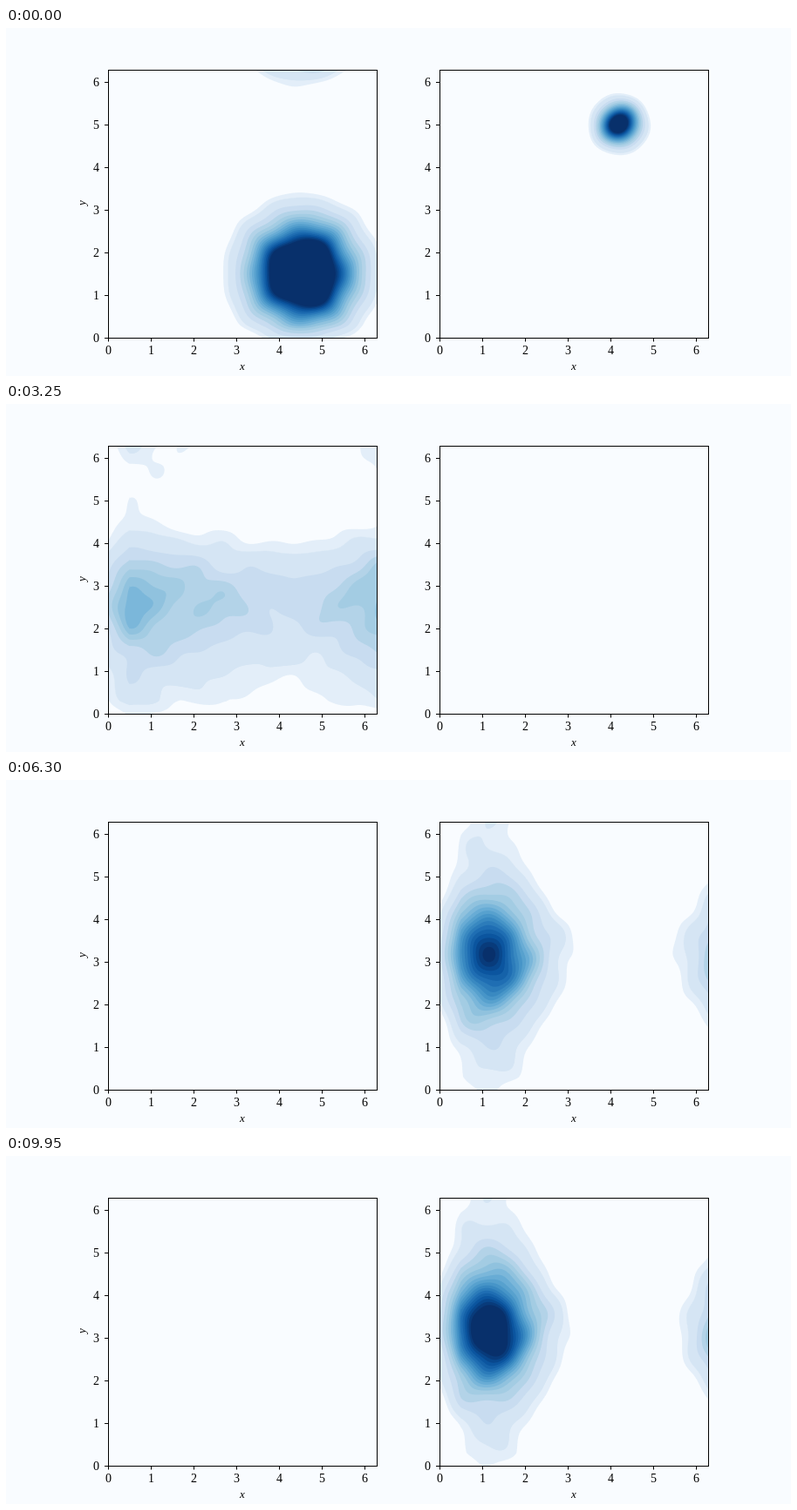
An HTML page with a canvas for the animation above (10000 ms loop, 900 by 400 pixels).

```html
<!DOCTYPE html>
<html lang="en">
<head>
<meta charset="utf-8">
<style>
  html, body { margin: 0; width: 100%; height: 100%; overflow: hidden; background: #f9fcff; }
  canvas { display: block; }
</style>
</head>
<body>
<canvas id="stage" width="900" height="400"></canvas>
<script>
const ctx = document.getElementById('stage').getContext('2d');
const SIZE = 308, TOP = 48, SPAN = 2 * Math.PI, UNIT = SIZE / SPAN;
const LOOP = 10000, STEP = 50, STEPS = LOOP / STEP;
const CELLS = SIZE / 2, CELL = SPAN / CELLS;

const mix = (a, b, k) => a + (b - a) * k;
const clamp = (v, lo, hi) => Math.max(lo, Math.min(hi, v));

// Drift towards a periodic well plus diffusion; both speed up with time.
const progress = t => .22 * Math.pow(t, 1.7);
const wellX = { centre: 1.18, pull: 1, spread: .36 };
const wellY = { centre: 3.2, pull: .68, spread: .42 };

// Density along one axis at every step, starting from a bell curve.
function evolve(mean, width, { centre, pull, spread }) {
  let p = Float64Array.from({ length: CELLS }, (_, i) => {
    let d = (i + .5) * CELL - mean;
    d -= SPAN * Math.round(d / SPAN);
    return Math.exp(-.5 * (d / width) ** 2) / (width * Math.sqrt(SPAN));
  });
  const drift = Array.from(p, (_, i) => pull * Math.sin((i + 1) * CELL - centre));
  const history = [];
  for (let step = 0; step < STEPS; step++) {
    history.push(p);
    const advance = progress((step + 1) * STEP / 1000) - progress(step * STEP / 1000);
    const substeps = Math.ceil(advance / .0015), k = advance / substeps / CELL;
    for (let s = 0; s < substeps; s++) {
      const flux = drift.map((f, i) => {
        const next = p[(i + 1) % CELLS];
        return f * (p[i] + next) / 2 + spread * (next - p[i]) / CELL;
      });
      p = p.map((v, i) => v + k * (flux[i] - flux[(i + CELLS - 1) % CELLS]));
    }
  }
  return history;
}

const population = (x, y, width) => ({ x: evolve(x, width, wellX), y: evolve(y, width, wellY) });
const crowd = population(4.55, 1.52, .665);
const seedling = population(4.2, 5, .276);

// The left crowd dies out while its offspring take over the right panel.
const panels = [
  { left: 117, phase: 0, groups: [
    { shape: crowd, mass: t => 97 * (1 - Math.min(1, t / 6.1) ** 1.7) }
  ] },
  { left: 497, phase: 2.4, groups: [
    { shape: seedling, mass: t => 10.5 * Math.exp(-.15 * t * t) },
    { shape: crowd, mass: t => 79 / (1 + Math.exp(-2.13 * (t - 5.5))) }
  ] }
];

// Blue colour scale, cut into 18 bands above the background.
const BANDS = 18, SUB = 8;
const ramp = ['f7fbff', 'deebf7', 'c6dbef', '9ecae1', '6baed6', '4292c6', '2171b5', '08519c', '08306b']
  .map(hex => [0, 2, 4].map(i => parseInt(hex.slice(i, i + 2), 16)));
function blues(s) {
  const p = clamp(s, 0, 1) * 8, i = Math.min(7, Math.floor(p));
  return ramp[i].map((c, j) => mix(c, ramp[i + 1][j], p - i));
}
const palette = [[249, 252, 255]];
for (let i = 1; i <= BANDS; i++) palette.push(blues(i < 5 ? .03 + .07 * i : .11 + .05 * i));
const shades = Uint32Array.from({ length: BANDS * SUB + 1 }, (_, j) => {
  const i = Math.min(BANDS - 1, Math.floor(j / SUB));
  const [r, g, b] = palette[i].map((c, n) => Math.round(mix(c, palette[i + 1][n], j / SUB - i)));
  return (255 << 24 | b << 16 | g << 8 | r) >>> 0;
});

const image = ctx.createImageData(SIZE, SIZE);
const pixels = new Uint32Array(image.data.buffer);
const field = new Float32Array(SIZE * SIZE);
const axis = Array.from({ length: SIZE }, (_, i) => (i + .5) / UNIT);

// The estimate loses density next to the lower seams.
const seam = (low, reach) => axis.map(v => mix(low, 1, Math.min(1, v / reach)));
const seamX = seam(.5, .5), seamY = seam(.75, .3);

// Interpolates cell values at every pixel along an axis.
function sample(cells) {
  return axis.map(v => {
    const p = v / CELL - .5 + CELLS, i = Math.floor(p);
    return mix(cells[i % CELLS], cells[(i + 1) % CELLS], p - i);
  });
}

// Slowly drifting ripples that roughen the contours.
function ripples(t, phase) {
  return [0, 1, 2].map(i => ({
    x: axis.map(x => (.14 - .02 * i) * Math.sin((2.7 + 1.6 * i) * x + phase + 2 * i + 1.1 * t)),
    y: axis.map(y => Math.sin((3 + 1.5 * i) * y + 2 * phase + i - .8 * t))
  }));
}

function fillField({ groups, phase }, step) {
  const t = step * STEP / 1000;
  const parts = groups.map(({ shape, mass }) => ({
    x: sample(shape.x[step]), y: sample(shape.y[step]), mass: mass(t)
  }));
  const waves = ripples(t, phase);
  for (let row = 0, i = 0; row < SIZE; row++) {
    const y = SIZE - 1 - row;
    const weights = parts.map(part => part.mass * part.y[y] * seamY[y]);
    for (let col = 0; col < SIZE; col++, i++) {
      let v = 0;
      for (let k = 0; k < parts.length; k++) v += weights[k] * parts[k].x[col];
      v *= seamX[col];
      if (v > .2) {
        let n = 0;
        for (const wave of waves) n += wave.x[col] * wave.y[y];
        v *= Math.exp(n / (1 + .06 * v));
      }
      field[i] = v < 1 ? (v - .65) / .35 : v;
    }
  }
}

// Flat colour per band, blended over one pixel at each contour.
function paintBands(left) {
  for (let row = 0, i = 0; row < SIZE; row++) {
    for (let col = 0; col < SIZE; col++, i++) {
      const level = field[i];
      const dx = level - field[i + (col ? -1 : 1)];
      const dy = level - field[i + (row ? -SIZE : SIZE)];
      const slope = Math.sqrt(dx * dx + dy * dy) + 1e-6;
      const contour = clamp(Math.round(level), 0, BANDS - 1);
      const offset = clamp((level - contour) / slope, -.5, .5);
      pixels[i] = shades[Math.round((contour + offset + .5) * SUB)];
    }
  }
  ctx.putImageData(image, left, TOP);
}

function label(text, x, y, align = 'center', font = '14px') {
  ctx.font = font + ' "Liberation Serif", serif';
  ctx.textAlign = align;
  ctx.fillText(text, x, y);
}

function drawAxes(left) {
  const x0 = left + .5, y0 = TOP + SIZE + .5;
  ctx.fillStyle = ctx.strokeStyle = '#000';
  ctx.lineWidth = 1;
  ctx.strokeRect(x0, TOP + .5, SIZE, SIZE);
  ctx.beginPath();
  for (let n = 0; n <= 6; n++) {
    const d = Math.round(n * UNIT);
    ctx.moveTo(x0 + d, y0);
    ctx.lineTo(x0 + d, y0 + 4);
    ctx.moveTo(x0, y0 - d);
    ctx.lineTo(x0 - 4.5, y0 - d);
    label(n, x0 + d, y0 + 18.5);
    label(n, x0 - 10.5, y0 - d + 4.5, 'right');
  }
  ctx.stroke();
  label('x', left + 154, 393, 'center', 'italic 13px');
}

function drawYLabel() {
  ctx.save();
  ctx.translate(91, 201);
  ctx.rotate(-Math.PI / 2);
  label('y', 0, 0, 'center', 'italic 13px');
  ctx.restore();
}

let shown = -1;
function draw() {
  const step = Math.floor(performance.now() % LOOP / STEP);
  if (step !== shown) {
    shown = step;
    ctx.fillStyle = '#f9fcff';
    ctx.fillRect(0, 0, 900, 400);
    for (const panel of panels) {
      fillField(panel, step);
      paintBands(panel.left);
      drawAxes(panel.left);
    }
    drawYLabel();
  }
  requestAnimationFrame(draw);
}
draw();
</script>
</body>
</html>
```
